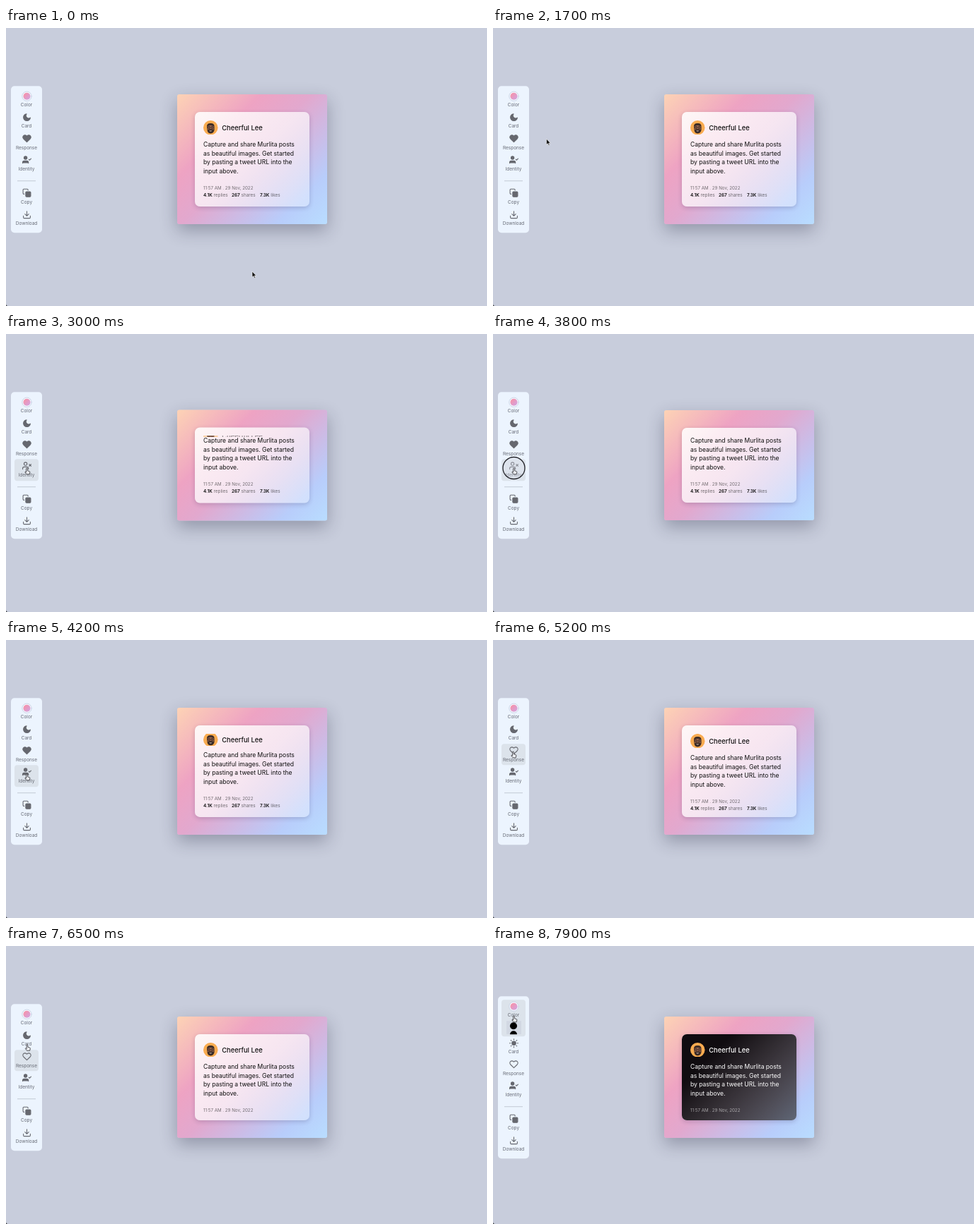
Animation, 680 px wide and 394 px high, one loop 8 s. Source, as an HTML page:

```html
<!DOCTYPE html>
<html lang="en">
<head>
<meta charset="utf-8">
<title>Post card</title>
<style>
html, body { margin: 0; width: 100%; height: 100%; overflow: hidden; background: #c8cddc; }
body { position: relative; font-family: Inter, sans-serif; }
.bar, .frame { position: absolute; top: 186px; transform: translateY(-50%); box-sizing: border-box; }
.bar { left: 7px; width: 44px; padding: 4.5px 5px; border-radius: 5px; background: #ecf4fe; }
.item { border-radius: 4px; text-align: center; color: #666a74; font-size: 6.45px; }
.item.on { background: #dce3eb; }
.head { position: relative; height: 30.3px; white-space: nowrap; }
.head svg { position: absolute; left: 10.5px; top: 3px; width: 13px; height: 13px; overflow: visible;
  fill: none; stroke: #66686f; stroke-width: 2; stroke-linecap: round; stroke-linejoin: round; }
.head span { position: absolute; left: 0; right: 0; top: 17.5px; line-height: 10px; }
.solid { fill: #66686f; }
hr { width: 26px; height: 1px; margin: 8px auto 7.8px; border: 0; background: #c3c9d4; }
.strip { width: 21px; margin: 0 auto; overflow: hidden; background: #d2d8e3; }
.strip i { display: block; width: 10px; height: 10px; margin: 2px auto; border-radius: 50%; background: #000; }
.frame { left: 242px; width: 212px; padding: 25px; border-radius: 3px;
  background: linear-gradient(135deg, #fdd3b5, #eea3c3 30%, #e2a8ce 48%, #b8cdfb 82%, #b9ddff);
  box-shadow: 0 9px 24px rgba(30, 35, 60, .32); }
.card { position: relative; box-sizing: border-box; padding: 12px 12px 9px; border-radius: 7px; white-space: nowrap;
  background: linear-gradient(135deg, rgba(255,255,255,.88), rgba(255,255,255,.7) 50%, rgba(255,255,255,.34));
  box-shadow: 0 2px 6px rgba(40, 30, 70, .2); }
.card > * { position: relative; }
.card > .dark { position: absolute; inset: 0; border-radius: 7px;
  background: linear-gradient(135deg, #100c10 25%, rgba(14,14,20,.58)); }
.who { display: flex; align-items: center; overflow: hidden; font-size: 9.35px; font-weight: 500; }
.who svg { flex: none; width: 20.5px; height: 20.5px; margin-right: 5.7px; }
.text { height: 50px; margin-bottom: 13px; font-size: 8.53px; line-height: 12.5px; }
.date { height: 10px; font-size: 6.2px; line-height: 10px; opacity: .56; }
.stats { overflow: hidden; font-size: 6.4px; line-height: 10px; }
.stats span { position: absolute; top: 0; }
.stats b { font-weight: 600; }
.stats em { font-style: normal; opacity: .56; }
#over { position: absolute; left: 0; top: 0; pointer-events: none; }
</style>
</head>
<body>
<div class="bar" id="bar"></div>
<div class="frame"><div class="card" id="card">
  <div class="dark" id="dark"></div>
  <div class="who" id="who">
    <svg viewBox="0 0 20 20">
      <circle cx="10" cy="10" r="10" fill="#f8ab50"/>
      <path d="M4.8 9Q4.4 4 10 4T15.2 9V13Q14.6 18 10 18T5.4 13Z" fill="#3a2a25"/>
      <path d="M5.4 8.4Q10 4.6 14.6 8.4L14.2 13Q10 10.8 5.8 13Z" fill="#96634a"/>
      <path d="M8 14.2H12Q10 16 8 14.2Z" fill="#e9d6cf"/>
      <g fill="#7a503c" stroke="#2a2224" stroke-width=".6"><circle cx="7.7" cy="9.7" r="1.6"/><circle cx="12.3" cy="9.7" r="1.6"/></g>
    </svg>Cheerful Lee</div>
  <div class="text">Capture and share Murlita posts<br>as beautiful images. Get started<br>by pasting a tweet URL into the<br>input above.</div>
  <div class="date">11:57 AM . 29 Nov, 2022</div>
  <div class="stats" id="stats"></div>
</div></div>
<svg id="over" width="680" height="394">
  <path d="M0 391Q0 394 3 394H0Z" fill="#222"/>
  <circle id="ring" r="15.5" fill="#dfe4ee" fill-opacity=".32" stroke="#23242a" stroke-width="1.3"/>
  <path id="arrow" d="M0 0V8.2L1.9 6.5 3.2 9.4 4.5 8.8 3.2 6H5.7Z" fill="#111" stroke="#fff" stroke-width=".6"/>
  <path id="hand" d="M-.9 1a.9 .9 0 0 1 1.8 0V3.8l2.5 .7q1.2.4 .9 1.6L3.7 8.8H-.4L-2.7 5.9q.3-.9 1.1-.5l.7.7Z" fill="#eceef2" stroke="#2c2c32" stroke-width=".8"/>
</svg>
<script>
const $ = id => document.getElementById(id);
const LOOP = 8000, STEP = 100;

const person = '<path d="M16 21v-2a4 4 0 0 0-4-4H5a4 4 0 0 0-4 4v2"/><circle cx="8.5" cy="7" r="4"/>';
const heart = 'd="M20.84 4.61a5.5 5.5 0 0 0-7.78 0L12 5.67l-1.06-1.06a5.5 5.5 0 0 0-7.78 7.78l1.06 1.06L12 21.23l7.78-7.78 1.06-1.06a5.5 5.5 0 0 0 0-7.78z"';
const rays = [0, 45, 90, 135, 180, 225, 270, 315].map(a => `<path d="M12 1v2" transform="rotate(${a} 12 12)"/>`).join('');

// Each icon has a first and, for toggles, a second state.
const icons = {
  Color: [`<linearGradient id="g" x2="1" y2="1"><stop offset=".2" stop-color="#f394ae"/><stop offset=".8" stop-color="#d7a0d8"/></linearGradient>
    <circle cx="12" cy="12" r="12.3" fill="#f6f9ff" stroke="#c6cfe2" stroke-width="1.6"/><circle cx="12" cy="12" r="9.3" fill="url(#g)" stroke="none"/>`],
  Card: ['<path class="solid" d="M21 12.79A9 9 0 1 1 11.21 3 7 7 0 0 0 21 12.79z"/>',
    `<circle class="solid" cx="12" cy="12" r="5"/>${rays}`],
  Response: [`<path class="solid" ${heart}/>`, `<path ${heart}/>`],
  Identity: [`<g class="solid">${person}</g><path d="M17 11l2 2 4-4"/>`, `${person}<path d="M18 8l5 5M23 8l-5 5"/>`],
  Copy: ['<rect class="solid" x="9" y="9" width="13" height="13" rx="2"/><path d="M5 15H4a2 2 0 0 1-2-2V4a2 2 0 0 1 2-2h9a2 2 0 0 1 2 2v1"/>'],
  Download: ['<path d="M21 15v4a2 2 0 0 1-2 2H5a2 2 0 0 1-2-2v-4M7 10l5 5 5-5M12 15V3"/>']
};

$('bar').innerHTML = Object.entries(icons).map(([name, states]) =>
  (name === 'Copy' ? '<hr>' : '') +
  `<div class="item" id="${name}"><div class="head"><svg viewBox="0 0 24 24">` +
  states.map(s => `<g>${s}</g>`).join('') + `</svg><span>${name}</span></div>` +
  (name === 'Color' ? '<div id="panel"><div class="strip" id="strip"><i></i><i></i><i></i></div></div>' : '') +
  '</div>').join('');

$('stats').innerHTML = [['4.1K', 'replies'], ['267', 'shares'], ['7.3K', 'likes']]
  .map(([n, label], i) => `<span style="left:${i * 40}px"><b>${n}</b> <em>${label}</em></span>`).join('');

const clamp = x => Math.max(0, Math.min(1, x));
const smooth = x => x * x * (3 - 2 * x);

// The CSS "ease" curve.
function ease(x) {
  x = clamp(x);
  let lo = 0, hi = 1, s = 0;
  for (let i = 0; i < 20; i++) {
    s = (lo + hi) / 2;
    if (.75 * s * (1 - s) + s ** 3 < x) lo = s; else hi = s;
  }
  return .3 * s * (1 - s) ** 2 + 3 * s * s * (1 - s) + s ** 3;
}
const toggle = (t, click, length = 560) => ease((t - click - 80) / length);

const clicks = [2500, 3800, 5000, 6600];
const hovers = [[2100, 'Identity'], [4500, 'Response'], [6550, 'Card'], [7700, 'Color']];
// Cursor moves: start, end, x, y
const moves = [[0, 700, 87, 149], [1500, 2200, 29.5, 190], [4300, 4800, 28.5, 158], [6200, 6500, 30, 139.5], [7600, 7900, 29.5, 99]];

function cursorAt(t) {
  let x = 348, y = 345;
  for (const [from, to, mx, my] of moves) {
    const k = smooth(clamp((t - from) / (to - from)));
    x += (mx - x) * k;
    y += (my - y) * k;
  }
  return [x, y];
}

function setIcon(name, second) {
  const [a, b] = $(name).querySelector('svg').children;
  a.style.display = second ? 'none' : '';
  b.style.display = second ? '' : 'none';
}

function draw(t) {
  const who = 1 - toggle(t, 2500) + toggle(t, 3800);
  const stats = 1 - toggle(t, 5000);
  const dark = toggle(t, 6600, 420);
  const panel = 22 * clamp((t - 7750) / 150);

  $('who').style.height = 20 * who + 'px';
  $('who').style.marginBottom = 8 * who + 'px';
  $('stats').style.height = 12 * stats + 'px';
  $('dark').style.opacity = dark;
  const ink = 14 + 241 * dark;
  $('card').style.color = `rgb(${ink}, ${ink}, ${ink})`;
  $('panel').style.height = panel + 'px';
  $('strip').style.height = Math.max(0, panel - 3) + 'px';

  setIcon('Identity', t >= 2600 && t < 3900);
  setIcon('Response', t >= 5100);
  setIcon('Card', t >= 6700);
  const hover = hovers.filter(h => t >= h[0]).pop();
  for (const name in icons) $(name).classList.toggle('on', !!hover && hover[1] === name);

  const [x, y] = cursorAt(t);
  const place = `translate(${x} ${y})`;
  const overBar = x > 12 && x < 46;
  $('arrow').setAttribute('transform', place);
  $('hand').setAttribute('transform', place);
  $('ring').setAttribute('transform', place);
  $('arrow').style.display = overBar ? 'none' : '';
  $('hand').style.display = overBar ? '' : 'none';
  $('ring').style.display = clicks.some(c => t >= c && t < c + 100) ? '' : 'none';
}

const start = performance.now();
function tick() {
  const t = (performance.now() - start) % LOOP;
  draw(Math.floor(t / STEP) * STEP);
  requestAnimationFrame(tick);
}
tick();
</script>
</body>
</html>
```
